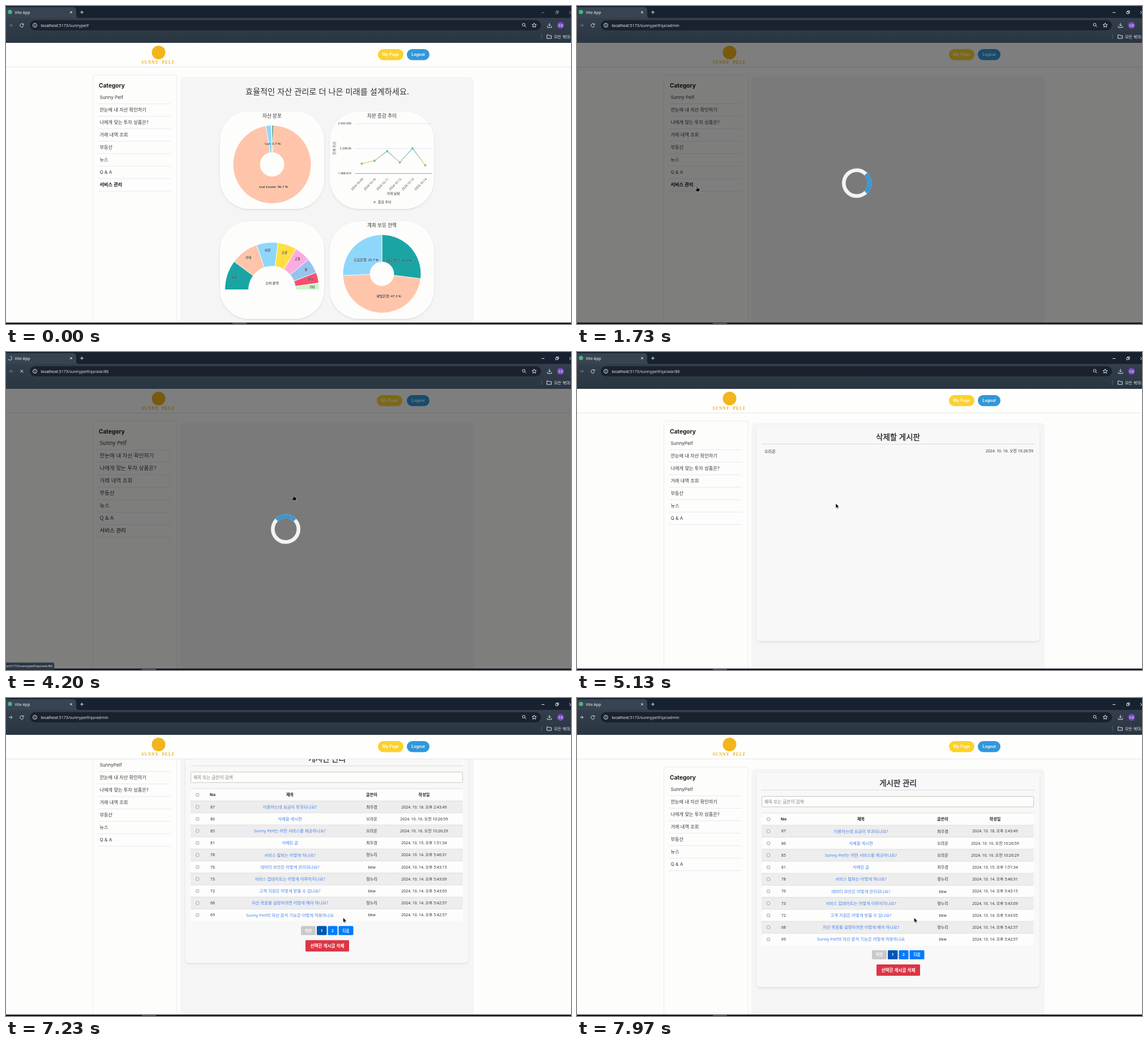
Write an HTML page that moves like this. It is 998 by 561 pixels and loops after 8000 ms.

```html
<!DOCTYPE html>
<html lang="ko">
<head>
<meta charset="utf-8">
<title>Vite App</title>
<style>
html, body { margin: 0; width: 100%; height: 100%; overflow: hidden; background: #fdfdfc; }
svg { display: block; width: 100vw; height: 100vh; }
text { font-family: "Noto Sans", "Noto Sans CJK KR", sans-serif; white-space: pre; }
.ui text, text.ui { font-family: Inter, "Noto Sans CJK KR", sans-serif; }
.fallback text { font-family: "Noto Sans CJK KR", sans-serif; }
.label { paint-order: stroke; stroke: #fff; stroke-opacity: .5; stroke-width: .5px; }
.heading { stroke: #222; stroke-width: .3px; }
.logo { font-family: "Liberation Serif", serif; letter-spacing: 1.15px; }
.icon { fill: none; stroke: #dfe3ea; stroke-width: 1; }
</style>
</head>
<body>
<svg id="stage" viewBox="0 0 998 561" preserveAspectRatio="none"></svg>
<script>
const LOOP = 8000;
const BRAND = 'Sunny Pelf';
const HOST = 'localhost', ROOT = ':5173/sunnypelf';

// Drawing helpers
const rect = (x, y, w, h, fill, more = '') =>
  `<rect x="${x}" y="${y}" width="${w}" height="${h}" fill="${fill}" ${more}/>`;
const circle = (x, y, r, fill, more = '') => `<circle cx="${x}" cy="${y}" r="${r}" fill="${fill}" ${more}/>`;
const path = (d, more = 'class="icon"') => `<path d="${d}" ${more}/>`;
const text = (x, y, s, size, fill = '#333', more = '') =>
  `<text x="${x}" y="${y + size * .36}" font-size="${size}" fill="${fill}" ${more}>${s}</text>`;
const mid = (x, y, s, size, fill = '#333', more = '') => text(x, y, s, size, fill, 'text-anchor="middle" ' + more);
const group = (id, body, more = '') => `<g id="${id}" ${more}>${body}</g>`;
const hline = (x1, x2, y, color) => path(`M${x1} ${y}H${x2}`, `stroke="${color}"`);
const bold = 'font-weight="700"';

function ring(cx, cy, R, r, slices, start = 0) {
  const at = (deg, rad) => {
    const a = deg * Math.PI / 180;
    return `${(cx + rad * Math.sin(a)).toFixed(2)} ${(cy - rad * Math.cos(a)).toFixed(2)}`;
  };
  let a = start;
  return slices.map(([span, fill]) => {
    const b = a + span, big = +(span > 180);
    const d = `M${at(a, R)}A${R} ${R} 0 ${big} 1 ${at(b, R)}L${at(b, r)}A${r} ${r} 0 ${big} 0 ${at(a, r)}Z`;
    a = b;
    return path(d, `fill="${fill}" stroke="#fff" stroke-width=".8"`);
  }).join('');
}

const TEAL = '#1aa5a4', SALMON = '#ffc5ab', SKY = '#8fd6fb';
const tag = (x, y, s, size = 6) => mid(x, y, s, size, '#000', 'class="label"');

function lineChart() {
  const values = [278, 273, 256, 276, 251, 281];
  const points = values.map((y, i) => [628.5 + i * 22.4, y]);
  const end = 'text-anchor="end"';
  return mid(664, 194, '자본 증감 추이', 8.6)
    + [[207, '2 430 990'], [251, '2 208.9k'], [295, '1 988 810']].map(([y, s]) => text(610, y, s, 5.2, '#333', end)).join('')
    + hline(617, 752, 207.5, '#e3e5f1') + hline(617, 752, 251.5, '#e3e5f1') + hline(617, 752, 295.5, '#a5ab58')
    + path('M' + points.join('L'), 'fill="none" stroke="url(#trend)" stroke-width="1.2"')
    + points.map(([x, y], i) => circle(x, y, 1.9, '#7ac47c')
      + text(0, 0, `2024-10-${String(9 + i).padStart(2, '0')}`, 5.4, '#444',
        `${end} transform="translate(${x + 1.5} 304.5) rotate(-45)"`)).join('')
    + mid(684, 331, '거래 날짜', 6)
    + mid(0, 0, '전체 자산', 6, '#555', 'transform="translate(579.5 251) rotate(-90)"')
    + circle(651, 346, 1.9, '#7ac47c') + text(657, 346, '증감 추이', 6);
}

function spendingChart() {
  const slices = [[36.6, TEAL], [34.3, SALMON], [26.3, SKY], [23.4, '#ffdf45'], [19.8, '#fbabe1'],
    [18.3, '#96c3ee'], [13.1, '#f9506f'], [8.2, '#c9f7cb']];
  const names = [['여가', 403, 479], ['카페', 428, 444], ['여행', 462, 431], ['쇼핑', 492, 435],
    ['교통', 515, 446], ['술', 530, 465], ['편의', 538, 482], ['기타', 541, 496]];
  return ring(470, 500.5, 83.5, 41.5, slices, -90)
    + names.map(([s, x, y]) => tag(x, y, s, 5.4)).join('') + mid(470, 489, '소비 분석', 6, '#111');
}

function dashboard() {
  const cards = [[378, 186], [572, 186], [378, 380], [572, 380]];
  return mid(567.5, 151, '효율적인 자산 관리로 더 나은 미래를 설계하세요.', 14.2, '#333', 'class="ui"')
    + cards.map(([x, y]) => rect(x, y, 184, 172, '#fdfdfc', 'rx="52" filter="url(#soft)"')).join('')
    + mid(470, 194, '자산 분포', 8.6)
    + ring(470, 279.5, 69, 21, [[2.6, '#2f7f62'], [348.4, SALMON], [8, SKY], [1, '#ffdf45']])
    + tag(471, 242.5, 'Car: 0.7 %') + tag(472.5, 319, 'real estate: 96.7 %')
    + lineChart() + spendingChart()
    + mid(664, 387, '계좌 보유 잔액', 8.6)
    + ring(664, 472.5, 69, 21, [[97.2, TEAL], [170.3, SALMON], [92.5, SKY]])
    + tag(636, 447.5, '도담은행: 25.7 %') + tag(692.5, 448.5, '다라모뱅크: 27.0 %') + tag(676, 512, '새빛은행: 47.3 %');
}

const sheet = title => rect(317, 132, 500, 378, '#f8f8f8', 'rx="6" filter="url(#soft)"')
  + mid(567, 150, title, 13.5, '#222', 'class="heading"') + hline(326, 807, 162.5, '#d9d9e6');
const checkbox = y => rect(335.8, y - 2.4, 4.8, 4.8, '#fff', 'rx=".8" stroke="#777" stroke-width=".7"');
const button = (x, y, w, h, fill, s, size = 6.6) =>
  rect(x, y, w, h, fill, 'rx="1.6"') + mid(x + w / 2, y + h / 2, s, size, '#fff', 'font-weight="600"');

function board() {
  const [ann, ben, cho, dan] = ['최무겸', '오라온', '정누리', 'bkw'];
  const posts = [
    [87, '이용하는데 요금이 부과되나요?', ann, '18. 오후 2:43:49'],
    [86, '삭제할 게시판', ben, '16. 오전 10:26:59'],
    [85, `${BRAND}는 어떤 서비스를 제공하나요?`, ben, '16. 오전 10:26:29'],
    [81, '삭제된 글', ann, '15. 오후 1:51:34'],
    [78, '서비스 탈퇴는 어떻게 하나요?', cho, '14. 오후 5:46:31'],
    [76, '데이터 보안은 어떻게 관리되나요?', dan, '14. 오후 5:43:15'],
    [73, '서비스 업데이트는 어떻게 이루어지나요?', cho, '14. 오후 5:43:09'],
    [72, '고객 지원은 어떻게 받을 수 있나요?', dan, '14. 오후 5:43:05'],
    [68, '자산 목표를 설정하려면 어떻게 해야 하나요?', cho, '14. 오후 5:42:57'],
    [69, `${BRAND}의 자산 분석 기능은 어떻게 작동하나요`, dan, '14. 오후 5:42:57']];
  const rows = posts.map(([no, title, author, date], i) => {
    const y = 235 + i * 21.2;
    return rect(326, y - 10.6, 481, 21.2, i % 2 ? '#fdfdfc' : '#ededed') + hline(326, 807, y - 10.6, '#e0e0e6')
      + checkbox(y) + mid(365, y, no, 6.8)
      + mid(501.5, y, title, 7.4, '#4a83f0', no === 86 ? 'id="hotLink"' : '')
      + mid(646, y, author, 7.1) + mid(738.5, y, '2024. 10. ' + date, 6.9);
  }).join('');
  return sheet('게시판 관리')
    + rect(326.5, 173.5, 480, 18.5, '#fdfdfc', 'rx="1" stroke="#c8c9bd"')
    + text(331, 183, '제목 또는 글쓴이 검색', 7.7, '#808080')
    + rect(326, 203, 481, 21.4, '#fdfdfc') + hline(326, 807, 203, '#e0e0e6') + checkbox(213.7)
    + [[365, 'No'], [501.5, '제목'], [646, '글쓴이'], [738.5, '작성일']]
      .map(([x, s]) => mid(x, 213.7, s, 7.2, '#222', bold)).join('')
    + rows
    + button(521, 445, 26, 16, '#c9c9c9', '이전') + button(549, 445, 17.5, 16, '#0056b3', '1')
    + button(568.5, 445, 17, 16, '#007bff', '2') + button(587.5, 445, 26, 16, '#007bff', '다음')
    + button(529, 470, 77, 20, '#dc3545', '선택한 게시글 삭제', 7.6);
}

const post = () => sheet('삭제할 게시판')
  + text(331, 175, '오라온', 7.2) + text(806, 175, '2024. 10. 16. 오전 10:26:59', 6.9, '#333', 'text-anchor="end"');

function menu(id, brand, admin, size, look) {
  const items = [brand, '한눈에 내 자산 확인하기', '나에게 맞는 투자 상품은?', '거래 내역 조회', '부동산', '뉴스', 'Q &amp; A'];
  if (admin) items.push('서비스 관리');
  return group(id, items.map((s, i) =>
    text(165.5, 161 + i * 22, s, size, i === 7 ? '#111' : '#3a3a3a', i === 7 && look === 'ui' ? 'font-weight="600"' : '')
    + hline(162, 291, 172.5 + i * 22, '#e8e9f0')).join(''), `class="${look}"`);
}

const sidebar = () => path('M153.5 700V126q0-4 4-4H298q4 0 4 4V700', 'fill="#fdfdfc" stroke="#ebebef"')
  + text(164, 140, 'Category', 10.1, '#1c1c1c', bold + ' class="ui"')
  + menu('menuAdmin', BRAND, true, 8.2, 'ui')
  + menu('menuPlain', BRAND.replace(' ', ''), false, 8.2, 'ui')
  + menu('menuFallback', BRAND, true, 9.5, 'fallback');

const pill = (x, w, fill, s) => rect(x, 76, w, 19.5, fill, 'rx="9.75"')
  + mid(x + w / 2, 85.8, s, 7, '#fff', 'font-weight="600" class="ui"');
const siteHeader = () => rect(0, 65, 998, 42, '#fefefd') + hline(0, 998, 107.5, '#e6e6ec')
  + circle(269.5, 82, 12, '#f2b61c') + mid(269, 99.8, BRAND.toUpperCase().replace(' ', '  '), 7.2, '#eeb01c', 'class="logo" ' + bold)
  + group('myPage', pill(657, 45, '#fcd12c', 'My Page')) + pill(708, 40, '#3297d9', 'Logout');

const loader = () => rect(0, 65, 998, 494, '#000', 'opacity=".5"')
  + circle(494, 312.5, 22.7, 'none', 'stroke="#f3f3f3" stroke-width="6.6"')
  + group('spinner', path('M477.95 296.45A22.7 22.7 0 0 1 510.05 296.45', 'fill="none" stroke="#3498db" stroke-width="6.6"'));

const browser = () => rect(0, 0, 998, 22, '#172130')
  + path('M0 2H118Q124 2 124 8V17Q124 21 129 21H0Z', 'fill="#394452"')
  + rect(0, 21, 998, 44, 'url(#bar)')
  + group('favicon', circle(7, 10.5, 3.8, '#41b883'))
  + group('tabLoad', path('M7 7.5A3.4 3.4 0 1 1 4 12.5', 'fill="none" stroke="#7fc4c4" stroke-width="1.2"'))
  + text(15.5, 11.3, 'Vite App', 6.9, '#f2f4f7')
  + path('M113 9l4 4m0-4l-4 4M131 11h6m-3-3v6')
  + group('controls', path('M946 11.5h5M971 10h3.6v3.6H971zM972.4 10V8.6H976v3.6h-1.4M995 9l5 5m0-5l-5 5'))
  + group('forward', path('M5 34h6m-2.6-2.6L11 34l-2.6 2.6'))
  + group('reload', path('M30.6 32.5A3.1 3.1 0 1 0 31 35M31 30.8v2.2h-2.2'))
  + group('stop', path('M25.4 31.4l5 5m0-5l-5 5'))
  + rect(42, 25, 903, 18, '#1a222e', 'rx="9"')
  + circle(51, 34, 3.5, 'none', 'class="icon"') + path('M51 33.4v2.4M51 31.6v1')
  + `<text x="61.5" y="36.5" font-size="7.15" fill="#fff">${HOST}<tspan id="address" fill="#dde1e8"></tspan></text>`
  + circle(914.5, 33, 2.4, 'none', 'class="icon"') + path('M916.3 34.8l2.4 2.4')
  + path('M933 30l1.1 2.6 2.8.2-2.1 1.8.7 2.8-2.5-1.5-2.5 1.5.7-2.8-2.1-1.8 2.8-.2z')
  + path('M960 30v5m-2.2-2l2.2 2.2 2.2-2.2M956.3 35.5v2.3h7.4v-2.3')
  + circle(979.5, 34, 6, '#7748c4') + mid(979.5, 34, '무겸', 4.6, '#fff')
  + path('M946 50v8', 'stroke="#56606e"')
  + path('M955.5 51h2.8l1 1.2h4v5h-7.8z') + text(968, 54, '모든 북마크', 7.2, '#e6e9ee');

const statusBubble = () => rect(-4, 548, 89, 12, '#2b3644', 'rx="2" stroke="#485362" stroke-width=".6"')
  + text(82, 554, `${HOST}${ROOT}/qa/ask/86`, 6.1, '#e6e9ee', 'text-anchor="end"');

const outlined = 'fill="#0a0a0a" stroke="#fff" stroke-width=".5"';
const stage = document.getElementById('stage');
stage.innerHTML = `<defs>
  <filter id="soft" x="-10%" y="-10%" width="120%" height="125%"><feDropShadow dx="0" dy="1.5" stdDeviation="1.6" flood-opacity=".11"/></filter>
  <linearGradient id="trend" gradientUnits="userSpaceOnUse" x1="0" y1="250" x2="0" y2="282"><stop stop-color="#4fb4ec"/><stop offset="1" stop-color="#e9cf3e"/></linearGradient>
  <linearGradient id="bar" x2="0" y2="1"><stop stop-color="#343f4d"/><stop offset="1" stop-color="#2a3542"/></linearGradient>
</defs>`
  + rect(0, 0, 998, 561, '#fdfdfc')
  + group('content', sidebar() + rect(308, 125, 518, 600, '#f5f5f5', 'rx="7"')
    + group('dashboard', dashboard()) + group('board', board()) + group('post', post()))
  + siteHeader() + group('loader', loader()) + browser()
  + rect(0, 558.5, 998, 2.5, '#0b1524') + group('task', rect(0, 559, 25, 2, '#2f5560'))
  + group('status', statusBubble())
  + group('arrow', path('M0 0V8.6L2 6.8 3.3 9.6 4.7 9 3.4 6.2H6.1Z', outlined))
  + group('hand', path('M-.9 .8Q0-.8 .9 .8V3.6L4.2 4.4Q5.2 4.8 5 6L4.3 10H-.6L-3.4 6.4Q-3.4 5-2.2 5.4L-.9 6.4Z', outlined));

const el = Object.fromEntries([...stage.querySelectorAll('[id]')].map(n => [n.id, n]));
const show = (name, on) => { el[name].style.display = on ? '' : 'none'; };
const move = (name, x, y) => el[name].setAttribute('transform', `translate(${x} ${y})`);

// Eased interpolation over rows of [time, ...values]
function track(keys, t) {
  const i = keys.findIndex(k => k[0] > t);
  if (i < 0) return keys[keys.length - 1].slice(1);
  const [t0, ...a] = keys[i - 1], [t1, ...b] = keys[i];
  const u = (t - t0) / (t1 - t0), e = u * u * (3 - 2 * u);
  return a.map((v, j) => v + (b[j] - v) * e);
}

const POINTER = [[0, 412, 575], [150, 412, 575], [1000, 212, 317.5], [2200, 212, 317.5], [2850, 508, 252],
  [4900, 508, 252], [5700, 255.5, 326.5], [6300, 255.5, 326.5], [7000, 595.5, 387.5]];
const SCROLL = [[0, 0], [7050, 0], [7300, 52.7], [7600, 52.7], [7800, 0]];

function draw(t) {
  const within = (a, b) => t >= a && t < b;
  const firstLoad = within(1480, 2150), secondLoad = within(4130, 4700);
  const reopened = t >= 4700, back = t >= 5950;
  const reading = within(4700, 5950);

  show('dashboard', t < 1480);
  show('board', within(2150, 4130) || back);
  show('post', reading);
  show('loader', firstLoad || secondLoad);
  show('menuAdmin', t < 4130);
  show('menuFallback', secondLoad);
  show('menuPlain', reopened);
  move('myPage', secondLoad ? -2 : 0, 0);

  const turn = firstLoad ? (t - 1480) * .36 : Math.max(0, t - 4200) * .36;
  el.spinner.setAttribute('transform', `rotate(${turn} 494 312.5)`);

  const loading = within(3900, 4700);
  show('tabLoad', loading);
  show('favicon', !loading);
  show('stop', loading);
  show('reload', !loading);
  el.forward.style.opacity = back ? 1 : .4;
  el.controls.style.opacity = t < 600 ? .5 : 1;
  move('task', t < 600 ? 400 : 240, 0);
  el.address.textContent = ROOT + (t < 1480 ? '' : within(4000, 5950) ? '/qa/ask/86' : '/qa/admin');

  const [x, y] = track(POINTER, t);
  const hand = within(920, 2260) || within(2740, 4700);
  show('hand', hand);
  show('arrow', !hand);
  move(hand ? 'hand' : 'arrow', x, y);
  el.hotLink.setAttribute('text-decoration', within(2740, 4130) ? 'underline' : 'none');
  show('status', within(3250, 4700));
  move('content', 0, -track(SCROLL, t)[0]);
}

const began = performance.now();
function tick() {
  draw((performance.now() - began) % LOOP);
  requestAnimationFrame(tick);
}
tick();
</script>
</body>
</html>
```
